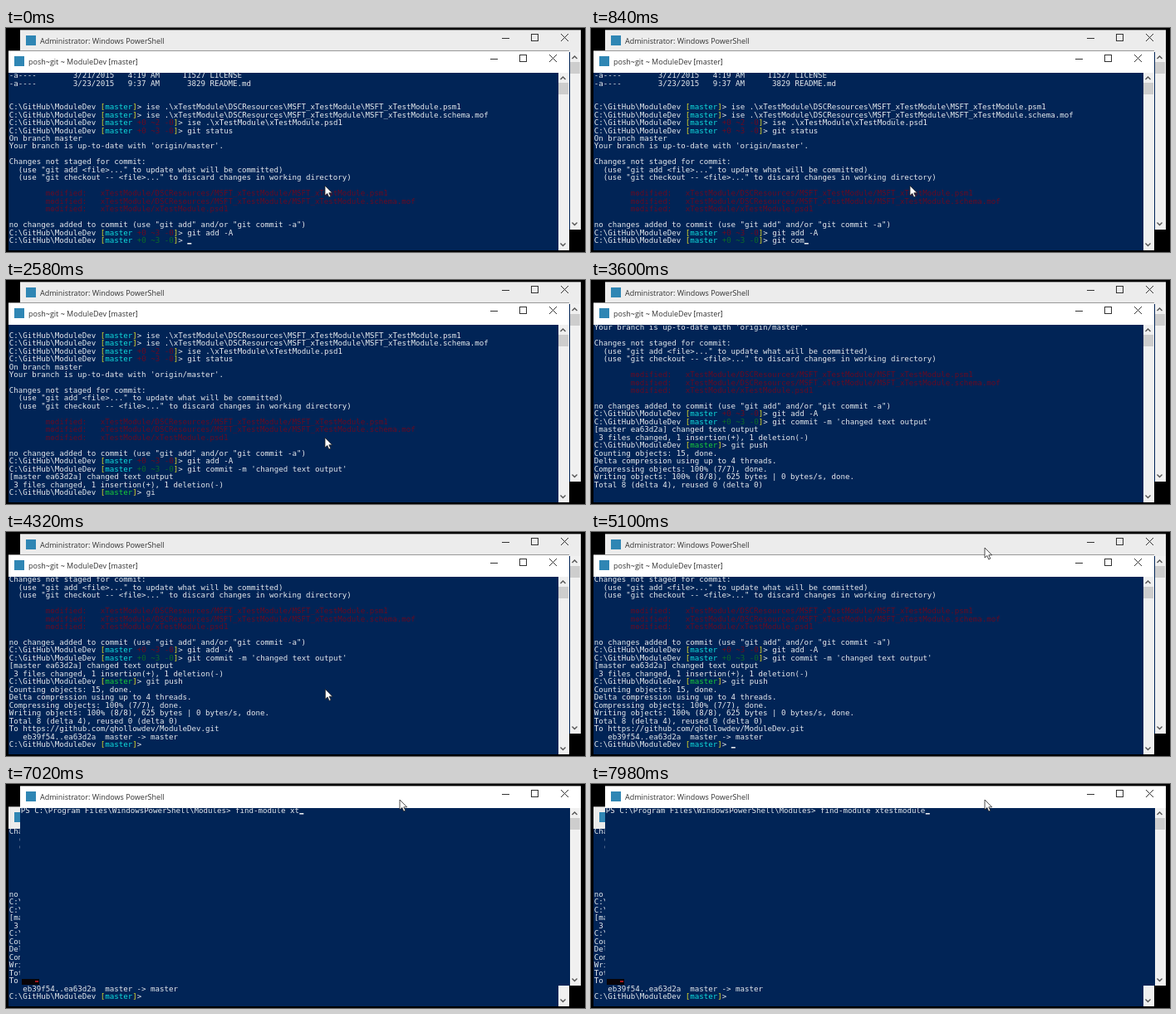
An HTML page with a canvas that plays this animation: 697 px wide and 270 px high, repeating every 8 s.

```html
<!DOCTYPE html>
<html lang="en">
<head>
<meta charset="utf-8">
<title>Terminal session</title>
<style>
  html, body { margin: 0; width: 100%; height: 100%; overflow: hidden; background: #000; }
  canvas { display: block; }
</style>
</head>
<body>
<canvas id="stage" width="697" height="270"></canvas>
<script>
const ctx = document.getElementById('stage').getContext('2d');
const LOOP = 8000;
const CELL = 5.5, LINE = 9.476, VISIBLE_ROWS = 22;
const MONO = '9.14px "DejaVu Sans Mono", monospace';
const TITLE = '9px "Open Sans", sans-serif';
const WHITE = '#e8ebef', CYAN = '#10dede', YELLOW = '#e6dc28', GREEN = '#18cf38';
const DARK_RED = '#680a22', DARK_GREEN = '#0b6a28', NAVY = '#012456';
const SWAP_TIME = 5340;

const text = (string, color = WHITE) => [[string, color]];

function prompt(command, { status = '', statusColor = DARK_RED, branch = CYAN } = {}) {
  return [
    ['C:\\GitHub\\ModuleDev ', WHITE], ['[', YELLOW], ['master', branch],
    [status, statusColor], [']', YELLOW], ['> ' + command, WHITE],
  ];
}

const resources = 'xTestModule\\DSCResources\\MSFT_xTestModule\\MSFT_xTestModule';
const modified = file => text('        modified:   ' + file.replaceAll('\\', '/'), DARK_RED);

const history = [
  text('-a----        3/21/2015   4:19 AM     11527 LICENSE'),
  text('-a----        3/23/2015   9:37 AM      3829 README.md'),
  [],
  [],
  prompt(`ise .\\${resources}.psm1`),
  prompt(`ise .\\${resources}.schema.mof`),
  prompt('ise .\\xTestModule\\xTestModule.psd1', { status: ' +0 ~2 -0' }),
  prompt('git status', { status: ' +0 ~3 -0' }),
  text('On branch master'),
  text("Your branch is up-to-date with 'origin/master'."),
  [],
  text('Changes not staged for commit:'),
  text('  (use "git add <file>..." to update what will be committed)'),
  text('  (use "git checkout -- <file>..." to discard changes in working directory)'),
  [],
  modified(resources + '.psm1'),
  modified(resources + '.schema.mof'),
  modified('xTestModule\\xTestModule.psd1'),
  [],
  text('no changes added to commit (use "git add" and/or "git commit -a")'),
  prompt('git add -A', { status: ' +0 ~3 -0' }),
];

// Keys are [time, characters typed], linear in between.
function typed(string, keys, t) {
  let count = 0;
  keys.forEach(([time, n], i) => {
    if (t < time) return;
    const next = keys[i + 1];
    count = next ? n + (next[1] - n) * Math.min(1, (t - time) / (next[0] - time)) : n;
  });
  return string.slice(0, Math.floor(count + 0.001));
}

const session = [
  [0, t => prompt(
    typed("git commit -m 'changed text output'", [[0, 0], [840, 7], [2060, 35]], t),
    { status: ' +0 ~3 -0', statusColor: DARK_GREEN })],
  [2160, () => []],
  [2220, () => text('[master ea63d2a] changed text output')],
  [2220, () => text(' 3 files changed, 1 insertion(+), 1 deletion(-)')],
  [2340, t => prompt(typed('git push', [[2380, 0], [2580, 2], [3000, 8]], t), { branch: GREEN })],
  [3060, () => []],
  [3180, () => text('Counting objects: 15, done.')],
  [3240, () => text('Delta compression using up to 4 threads.')],
  [3300, () => text('Compressing objects: 100% (7/7), done.')],
  [3420, () => text('Writing objects: 100% (8/8), 625 bytes | 0 bytes/s, done.')],
  [3480, () => text('Total 8 (delta 4), reused 0 (delta 0)')],
  [4200, () => text('To https://github.com/qhollowdev/ModuleDev.git')],
  [4200, () => text('   eb39f54..ea63d2a  master -> master')],
  [4320, () => prompt('')],
];

// An empty row is the waiting line; it stays below the output until a prompt replaces it.
function gitRows(t) {
  const rows = [...history];
  let waiting = false;
  for (const [time, build] of session) {
    if (t < time) break;
    const row = build(t);
    if (!row.length) waiting = true;
    else {
      if (row.length > 1) waiting = false;
      rows.push(row);
    }
  }
  if (waiting) rows.push([]);
  return rows.slice(-VISIBLE_ROWS);
}

function adminRows(t) {
  const command = typed('find-module xtestmodule', [[5700, 0], [6110, 5], [7800, 23]], t);
  return [text('PS C:\\Program Files\\WindowsPowerShell\\Modules> ' + command)];
}

function rect(x, y, w, h, color) {
  ctx.fillStyle = color;
  ctx.fillRect(x, y, w, h);
}

function polyline(points, color, width = 1) {
  ctx.beginPath();
  points.forEach(([x, y]) => ctx.lineTo(x, y));
  ctx.strokeStyle = color;
  ctx.lineWidth = width;
  ctx.stroke();
}

function drawRows(rows, showCursor) {
  ctx.font = MONO;
  let column = 0;
  rows.forEach((row, i) => {
    column = 0;
    for (const [string, color] of row) {
      ctx.fillStyle = color;
      ctx.fillText(string, 0.8 + column * CELL, 32.2 + i * LINE);
      column += string.length;
    }
  });
  if (showCursor) rect(0.8 + column * CELL, 32 + (rows.length - 1) * LINE, 5, 1.6, WHITE);
}

function drawScrollbar() {
  rect(662, 26, 13, 214, '#f0f0f0');
  rect(662, 38, 12, 14, '#cdcdcd');
  polyline([[664.5, 34], [667.5, 31], [670.5, 34]], '#555', 1.4);
  polyline([[664.5, 231.5], [667.5, 234.5], [670.5, 231.5]], '#555', 1.4);
}

function drawWindow(x, y, title, rows, active, blink) {
  ctx.save();
  ctx.translate(x, y);
  rect(0, -1, 675, 1, '#999');
  rect(0, 0, 675, 26, active ? '#fff' : '#ececec');
  rect(0, 26, 662, 214, NAVY);
  rect(7, 6, 12, 12, '#2f86b4');
  ctx.font = TITLE;
  ctx.fillStyle = '#333';
  ctx.fillText(title, 24, 16);

  const ink = '#333';
  polyline([[580, 9.5], [589, 9.5]], ink);
  ctx.strokeRect(615.5, 4.5, 8, 8);
  polyline([[651, 4], [660, 13]], ink);
  polyline([[660, 4], [651, 13]], ink);

  drawScrollbar();
  drawRows(rows, active && blink);
  ctx.restore();
}

function drawPointer(t) {
  if (t > 3300 && t < 4200) return;
  const p = Math.max(0, Math.min(1, (t - 4300) / 600));
  const ease = p * p * (3 - 2 * p);
  ctx.save();
  ctx.translate(384 + 90 * ease, 190 - 171 * ease);
  const arrow = new Path2D('M0 0V12L2.8 9.5L4.8 14L6.8 13L4.8 8.8H8.6Z');
  ctx.fillStyle = '#fff';
  ctx.fill(arrow);
  ctx.strokeStyle = '#222';
  ctx.lineWidth = 0.8;
  ctx.stroke(arrow);
  ctx.restore();
}

function draw(t) {
  const adminActive = t >= SWAP_TIME;
  const phase = t % 1000;
  const blink = phase < 200 || phase >= 700;
  const drawGit = () =>
    drawWindow(3, 28, 'posh~git ~ ModuleDev [master]', gitRows(t), !adminActive, blink);
  const drawAdmin = () => {
    drawWindow(17, 3, 'Administrator: Windows PowerShell', adminRows(t), adminActive, blink);
    rect(19, 235, 21, 7, '#080408');
    rect(35, 237, 4, 2, '#a01820');
  };

  rect(0, 0, 697, 270, '#000');
  if (adminActive) {
    drawGit();
    drawAdmin();
  } else {
    drawAdmin();
    drawGit();
  }
  drawPointer(t);
}

const start = performance.now();
function frame() {
  draw((performance.now() - start) % LOOP);
  requestAnimationFrame(frame);
}
frame();
</script>
</body>
</html>
```
